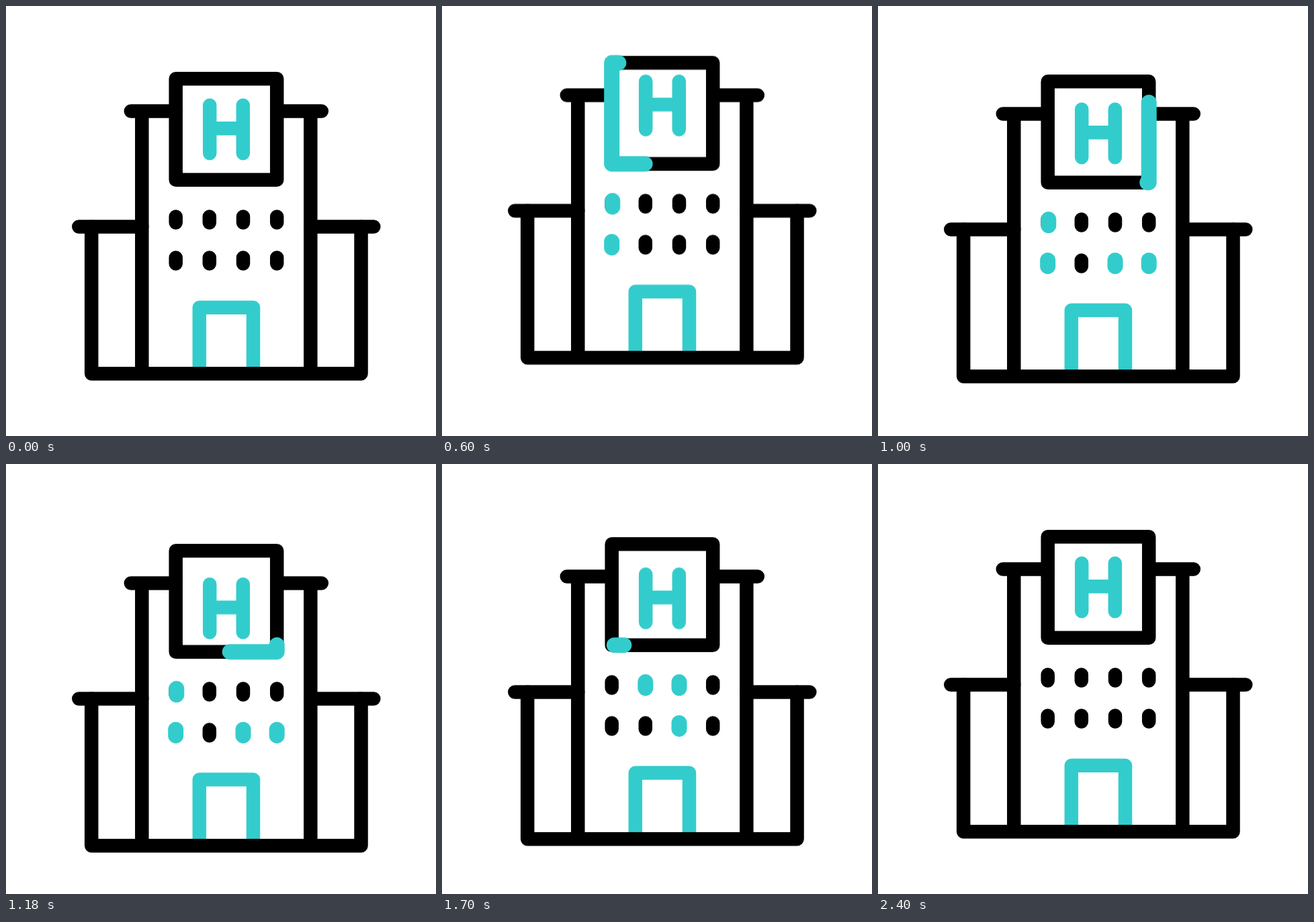
Animation of 640x640 px, one loop 2.62 s. Source, as an HTML page:

```html
<!DOCTYPE html>
<html lang="en">
<head>
<meta charset="utf-8">
<title>Hospital</title>
<style>
  @property --head { syntax: "<number>"; inherits: false; initial-value: 4; }
  @property --tail { syntax: "<number>"; inherits: false; initial-value: 4; }

  :root {
    --loop: 2.62s;
    --teal: #33cccc;
    --smooth: cubic-bezier(.3333, 0, .6667, 1);
  }
  html, body { margin: 0; width: 100%; height: 100%; overflow: hidden; background: #fff; }
  svg { display: block; width: 100%; height: 100%; }

  path { fill: none; stroke: #000; stroke-width: 20.5; stroke-linecap: round; stroke-linejoin: round; }
  .teal { stroke: var(--teal); }
  .flat { stroke-linecap: butt; }

  /* The letter adds its own swing on top of the building's. */
  .bob { animation: bob var(--loop) infinite; }
  .building { --swing: 25.6; }
  .letter { --swing: 12.8; }
  @keyframes bob {
    0% { transform: translateY(0); }
    7.634% { transform: translateY(0); animation-timing-function: var(--smooth); }
    30.534% { transform: translateY(calc(var(--swing) * -1px)); animation-timing-function: var(--smooth); }
    53.435% { transform: translateY(calc(var(--swing) * 1px)); animation-timing-function: cubic-bezier(.3333, .17, .6667, 1.02); }
    76.336%, 100% { transform: translateY(0); }
  }

  /* Both ends of the running line are eased separately. */
  .runner {
    stroke: var(--teal);
    stroke-width: 23;
    stroke-dasharray: calc((var(--head) - var(--tail)) * 1px) 2000px;
    stroke-dashoffset: calc(var(--tail) * -1px);
    animation: head var(--loop) infinite, tail var(--loop) infinite, show var(--loop) step-end infinite;
  }
  @keyframes head {
    0%, 7.634% { --head: 4; animation-timing-function: var(--smooth); }
    68.51%, 100% { --head: 750; }
  }
  @keyframes tail {
    0%, 15.573% { --tail: 4; animation-timing-function: var(--smooth); }
    76.336%, 100% { --tail: 750; }
  }
  @keyframes show { 0% { opacity: 0; } 7.7% { opacity: 1; } 76.32%, 100% { opacity: 0; } }

  .lights path {
    stroke: var(--teal);
    stroke-width: 23;
    opacity: 0;
    animation: var(--lit) var(--loop) step-end infinite;
  }
  @keyframes top1 { 0% { opacity: 0; } 22.9% { opacity: 1; } 49.62%, 100% { opacity: 0; } }
  @keyframes top2 { 0% { opacity: 0; } 53.44% { opacity: 1; } 91.58%, 100% { opacity: 0; } }
  @keyframes top3 {
    0% { opacity: 0; } 61.07% { opacity: 1; } 72.52% { opacity: 0; }
    83.95% { opacity: 1; } 91.58%, 100% { opacity: 0; }
  }
  @keyframes top4 { 0% { opacity: 0; } 26.72% { opacity: 1; } 38.17%, 100% { opacity: 0; } }
  @keyframes low1 { 0% { opacity: 0; } 22.9% { opacity: 1; } 61.07%, 100% { opacity: 0; } }
  @keyframes low3 { 0% { opacity: 0; } 38.17% { opacity: 1; } 68.7%, 100% { opacity: 0; } }
  @keyframes low4 { 0% { opacity: 0; } 38.17% { opacity: 1; } 61.07%, 100% { opacity: 0; } }
</style>
</head>
<body>
<svg viewBox="0 0 640 640">
  <g class="bob building">
    <path class="teal flat" d="M287.8 547V448.7H368V547"/>

    <path d="M108.3 328.5H202.3M453.3 328.5H547.3"/>
    <path d="M127.2 328.5V547.2H528.5V328.5"/>
    <path d="M185.8 156.4H252.7M403.2 156.4H469.8"/>
    <path class="flat" d="M202.3 156.4V547.2M453.3 156.4V547.2"/>

    <path d="M252.7 313.6v9M302.8 313.6v9M353 313.6v9M403.2 313.6v9
             M252.7 374.4v9M302.8 374.4v9M353 374.4v9M403.2 374.4v9"/>
    <g class="lights">
      <path style="--lit: top1" d="M253.8 313.6v9"/>
      <path style="--lit: top2" d="M302.8 313.6v9"/>
      <path style="--lit: top3" d="M353 313.6v9"/>
      <path style="--lit: top4" d="M403.2 313.6v9"/>
      <path style="--lit: low1" d="M252.7 374.4v9"/>
      <path style="--lit: low3" d="M353 374.4v9"/>
      <path style="--lit: low4" d="M403.2 374.4v9"/>
    </g>

    <path d="M252.7 108.3H403.2V258.7H252.7Z"/>
    <path class="runner" d="M403.2 258.7H252.7V108.3H403.2V258.7H252.7"/>

    <g class="bob letter">
      <path class="teal" d="M303.2 147.8V219.3M352.8 147.8V219.3M303.2 182.2H352.8"/>
    </g>
  </g>
</svg>
</body>
</html>
```
